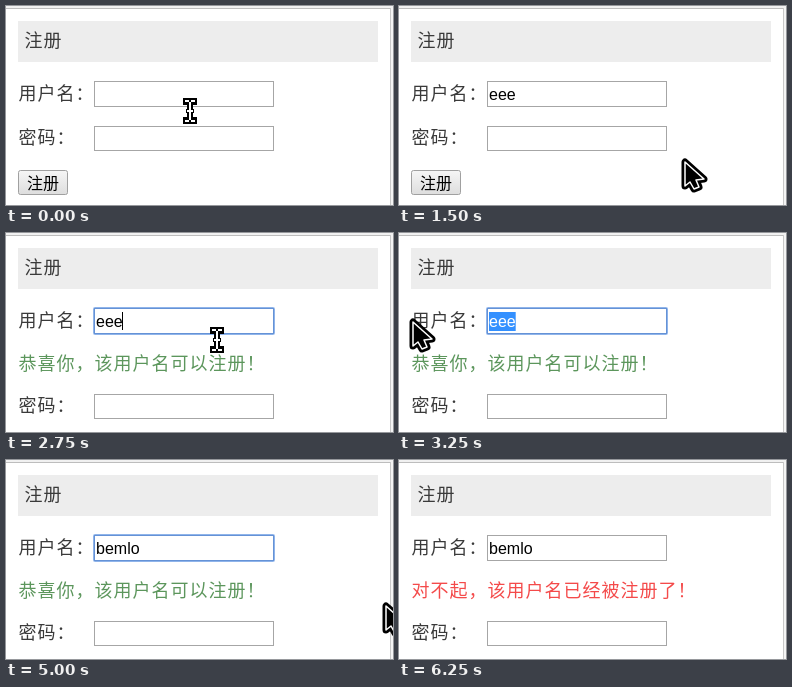
Write an HTML page with a canvas that moves like this. It is 387 px wide and 199 px high and loops after 7500 ms.

```html
<!DOCTYPE html>
<html lang="zh-CN">
<head>
<meta charset="utf-8">
<title>注册</title>
<style>
html, body { margin: 0; width: 100%; height: 100%; overflow: hidden; background: #fff; }
canvas { display: block; width: 387px; height: 199px; }
</style>
</head>
<body>
<canvas id="stage" width="387" height="199"></canvas>
<script>
const ctx = document.getElementById('stage').getContext('2d');
const LOOP = 7500;
const INK = '#3a3a3a';
const HAN = '"Noto Sans CJK SC", "Noto Sans CJK", sans-serif';

const FREE = { text: '恭喜你，该用户名可以注册！', color: '#5c965c' };
const TAKEN = { text: '对不起，该用户名已经被注册了！', color: '#f44a4a' };

const start = {
  value: '', focus: false, caret: false, selected: false,
  message: null, pointer: 'beam', x: 184, y: 105
};

// Each step changes only the listed parts of the state.
const steps = [
  [500, { focus: true, caret: true }],
  [750, { value: 'ee', y: 108 }],
  [1000, { value: 'eee', pointer: 'arrow', x: 172, y: 111 }],
  [1250, { x: 283, y: 152 }],
  [1500, { focus: false, caret: false }],
  [2000, { pointer: null }],
  [2250, { pointer: 'beam', x: 218, y: 117 }],
  [2500, { message: FREE, x: 211, y: 107 }],
  [2750, { focus: true, caret: true }],
  [3000, { selected: true, caret: false, pointer: 'arrow', x: 14, y: 82 }],
  [3250, { x: 11, y: 85 }],
  [3500, { value: 'b', selected: false, caret: true }],
  [3750, { value: 'be' }],
  [4000, { value: 'bem' }],
  [4250, { value: 'bemlo' }],
  [4750, { caret: false }],
  [5000, { x: 377, y: 142 }],
  [5250, { focus: false }],
  [5500, { x: 376, y: 194 }],
  [5750, { pointer: null }],
  [6250, { message: TAKEN }]
];

function stateAt(t) {
  const state = { ...start };
  for (const [at, change] of steps) if (t >= at) Object.assign(state, change);
  return state;
}

function rect(x, y, w, h, color) {
  ctx.fillStyle = color;
  ctx.fillRect(x, y, w, h);
}

function frame(x, y, w, h, color) {
  ctx.strokeStyle = color;
  ctx.lineWidth = 1;
  ctx.strokeRect(x + 0.5, y + 0.5, w - 1, h - 1);
}

// Sets each character in the middle of its own cell.
function han(text, x, middle, color = INK, size = 18, pitch = 19) {
  ctx.fillStyle = color;
  ctx.font = `300 ${size}px ${HAN}`;
  [...text].forEach((char, i) => {
    ctx.fillText(char, x + i * pitch + (pitch - size) / 2, middle + size * 0.38);
  });
}

function polygon(points) {
  ctx.beginPath();
  points.forEach(([x, y]) => ctx.lineTo(x, y));
  ctx.closePath();
}

function outline(color, width) {
  ctx.strokeStyle = color;
  ctx.lineWidth = width;
  ctx.stroke();
}

function drawPage() {
  rect(0, 0, 387, 199, '#fff');
  rect(0, 0, 387, 2, '#f1f1f1');
  rect(0, 2, 385, 1, '#bdbdbd');
  rect(384, 2, 1, 197, '#c8c8c8');
  rect(385, 2, 2, 197, '#f4f4f4');
  rect(12, 15, 360, 41, '#ededed');
  han('注册', 18, 34);
  han('用户名：', 12, 87);
}

function drawNameField({ value, focus, caret, selected }) {
  if (focus) {
    ctx.beginPath();
    ctx.roundRect(87.5, 74.5, 181, 27, 1);
    outline('#8fb4ea', 1);
  }
  frame(88, 75, 180, 26, focus ? '#6592d6' : '#a6a6a6');
  ctx.font = '16px "Liberation Sans", Arial, sans-serif';
  const width = ctx.measureText(value).width;
  if (selected) rect(90, 79, width, 19, '#3390ff');
  ctx.fillStyle = selected ? '#fff' : '#000';
  ctx.fillText(value, 90, 94);
  if (caret) rect(Math.floor(90 + width), 79, 1, 18, '#000');
}

function drawButton() {
  const shade = ctx.createLinearGradient(0, 164, 0, 189);
  shade.addColorStop(0, '#f6f6f6');
  shade.addColorStop(1, '#dddddd');
  ctx.beginPath();
  ctx.roundRect(12.5, 164.5, 49, 24, 2);
  ctx.fillStyle = shade;
  ctx.fill();
  outline('#a0a0a0', 1);
  han('注册', 21, 176.5, '#000', 16, 16);
}

function drawRest({ message }) {
  const shift = message ? 41 : 0;
  if (message) han(message.text, 12, 130, message.color);
  else drawButton();
  han('密码：', 12, 131 + shift);
  frame(88, 120 + shift, 180, 25, '#a6a6a6');
}

const pointers = {
  arrow() {
    polygon([[3, 4], [3, 28], [8, 24], [12, 31], [17, 29], [14, 22], [22, 21]]);
    ctx.lineJoin = 'round';
    outline('#000', 7);
    ctx.fillStyle = '#000';
    ctx.fill();
    outline('#fff', 1.5);
  },
  beam() {
    for (const y of [-13, 6]) rect(-7, y, 14, 7, '#000');
    rect(-3, -6, 6, 12, '#000');
    rect(-4, -2, 8, 4, '#000');
    for (const y of [-11, 9]) {
      rect(-5, y, 4, 2, '#fff');
      rect(1, y, 4, 2, '#fff');
    }
    rect(-1, -9, 2, 18, '#fff');
    rect(-3, -1, 6, 2, '#fff');
  }
};

function drawPointer({ pointer, x, y }) {
  if (!pointer) return;
  ctx.save();
  ctx.translate(x, y);
  pointers[pointer]();
  ctx.restore();
}

function draw(t) {
  const state = stateAt(t);
  drawPage();
  drawNameField(state);
  drawRest(state);
  drawPointer(state);
}

const begin = performance.now();
function tick() {
  draw((performance.now() - begin) % LOOP);
  requestAnimationFrame(tick);
}
tick();
</script>
</body>
</html>
```
